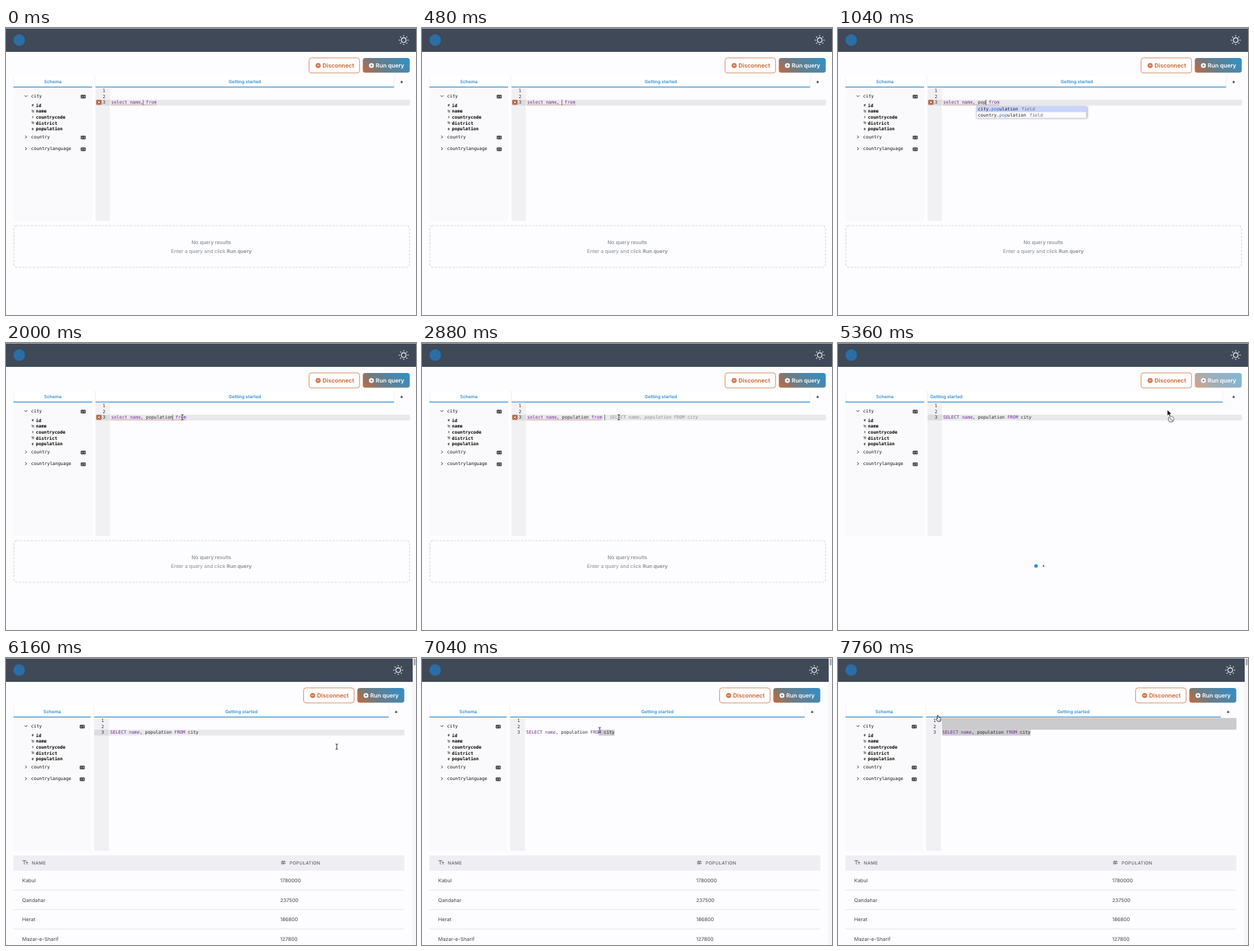
Write an HTML page with a canvas that moves like this. It is 600 px wide and 421 px high and loops after 8000 ms.

```html
<!DOCTYPE html>
<html lang="en">
<head>
<meta charset="utf-8">
<title>Query editor</title>
<style>
html, body { margin: 0; width: 100%; height: 100%; overflow: hidden; background: #fdfcfe; }
canvas { display: block; width: 600px; height: 421px; }
</style>
</head>
<body>
<canvas id="stage"></canvas>
<script>
const W = 600, H = 421, LOOP = 8000, STEP = 80;
const MONO = '"DejaVu Sans Mono", monospace';
const SANS = 'Inter, "Open Sans", sans-serif';
const CODE = '6.5px ' + MONO;
const CHAR = 6.5 * 0.602, ROW = 8.6, TOP = 88;
const BLUE = '#2f8ad0', ORANGE = '#cb632f', INK = '#26262a', PURPLE = '#6f2c9c';

const canvas = document.getElementById('stage');
const ctx = canvas.getContext('2d');
const dpr = window.devicePixelRatio || 1;
canvas.width = W * dpr;
canvas.height = H * dpr;

// Moments of the session, in ms
const T = {
  space: 240, p: 640, o: 800, pop: 960, accept: 1440, showMouse: 1760, click: 2240,
  ghost: 2640, complete: 3840, valid: 4160, leave: 4480, run: 5040, loaded: 5760, drag: 6960
};

// Mouse path: time, x, y
const PATH = [
  [1760, 203, 109], [2160, 288, 109], [4480, 288, 109], [4960, 552, 58], [5120, 552, 58],
  [5360, 483, 101], [5600, 484, 118], [6160, 484, 130], [6240, 484, 130], [6640, 298.5, 111],
  [6880, 298.5, 111], [7360, 150, 91], [7760, 147, 88]
];

function fill(color, x, y, w, h) {
  ctx.fillStyle = color;
  ctx.fillRect(x, y, w, h);
}

function round(x, y, w, h, r) {
  ctx.beginPath();
  ctx.roundRect(x, y, w, h, r);
}

function disc(x, y, r, color) {
  ctx.fillStyle = color;
  ctx.beginPath();
  ctx.arc(x, y, r, 0, Math.PI * 2);
  ctx.fill();
}

function line(points, color, width = 1) {
  ctx.strokeStyle = color;
  ctx.lineWidth = width;
  ctx.beginPath();
  points.forEach(([x, y], i) => i ? ctx.lineTo(x, y) : ctx.moveTo(x, y));
  ctx.stroke();
}

function text(str, x, y, font, color, align = 'left') {
  ctx.font = font;
  ctx.fillStyle = color;
  ctx.textAlign = align;
  ctx.fillText(str, x, y);
}

const sans = (size, weight = 400) => `${weight} ${size}px ${SANS}`;

function mouseAt(t) {
  let i = 0;
  while (i < PATH.length - 2 && t >= PATH[i + 1][0]) i++;
  const [t0, x0, y0] = PATH[i], [t1, x1, y1] = PATH[i + 1];
  const k = Math.min(1, Math.max(0, (t - t0) / (t1 - t0)));
  const e = k * k * (3 - 2 * k);
  return { x: x0 + (x1 - x0) * e, y: y0 + (y1 - y0) * e };
}

function layout(t) {
  const narrow = t >= T.loaded, loading = t >= T.run && !narrow;
  const dx = narrow ? -8 : 0;
  return {
    narrow, loading, dx,
    right: 591 + dx,
    side: narrow ? 124 : 126,
    left: narrow ? 129 : 131,
    code: narrow ? 152.6 : 154,
    tabEnd: loading ? 563 : 568 + dx
  };
}

function drawHeader(L) {
  fill('#3f4958', 0, 0, L.narrow ? 595.5 : W, 35);
  fill('#c9ccd1', 0, 0, W, 0.8);
  disc(19.3, 17.8, 8.5, '#2b6ea6');
  const x = 582 + L.dx, y = 17.8;
  ctx.strokeStyle = '#fff';
  ctx.lineWidth = 1.1;
  ctx.beginPath();
  ctx.arc(x, y, 3.4, 0, Math.PI * 2);
  ctx.stroke();
  for (let i = 0; i < 8; i++) {
    const c = Math.cos(i * Math.PI / 4), s = Math.sin(i * Math.PI / 4);
    line([[x + c * 5.4, y + s * 5.4], [x + c * 7.3, y + s * 7.3]], '#fff', 1.1);
  }
}

function drawButtons(L) {
  const font = sans(8.45, 600);
  ctx.save();
  ctx.translate(L.dx, 0);
  round(443.5, 43.9, 73.9, 22, 3.5);
  ctx.fillStyle = '#fffefe';
  ctx.fill();
  ctx.strokeStyle = '#d98f69';
  ctx.lineWidth = 1;
  ctx.stroke();
  disc(456.8, 55, 3.6, ORANGE);
  fill('#fff', 455.2, 53.5, 1, 3);
  fill('#fff', 457.4, 53.5, 1, 3);
  text('Disconnect', 463.2, 58, font, ORANGE);

  ctx.globalAlpha = L.loading ? 0.62 : 1;
  const g = ctx.createLinearGradient(533.7, 77.7, 579.3, 32.3);
  g.addColorStop(0, '#cb6736');
  g.addColorStop(0.35, '#6b7c85');
  g.addColorStop(1, '#2f90c9');
  round(522.2, 44.1, 68.6, 21.5, 3.5);
  ctx.fillStyle = g;
  ctx.fill();
  ctx.globalAlpha = 1;
  disc(534.8, 55, 3.6, '#fff');
  ctx.fillStyle = '#607683';
  ctx.beginPath();
  ctx.moveTo(533.8, 53.2);
  ctx.lineTo(536.7, 55);
  ctx.lineTo(533.8, 56.8);
  ctx.fill();
  text('Run query', 541, 58, font, '#fff');
  ctx.restore();
}

function drawTabs(L) {
  const font = sans(6.5, 600);
  fill('#fff', 11, 70, L.side - 11, 17);
  fill('#fff', L.left, 70, L.tabEnd - L.left, 17);
  fill('#e9e8ec', 11, 70, 0.6, 16);
  fill('#e9e8ec', L.left - 0.3, 70, 0.6, 16);
  fill(BLUE, 11, 86, L.side - 11, 1.2);
  fill(BLUE, L.left, 86, L.tabEnd - L.left, 1.2);
  text('Schema', (11 + L.side) / 2, 80.8, font, BLUE, 'center');
  if (L.loading) text('Getting started', 135, 80.8, font, BLUE);
  else text('Getting started', (L.left + L.tabEnd) / 2, 80.8, font, BLUE, 'center');
  fill('#e9e8ec', L.tabEnd - 0.3, 70, 0.6, 16);
  const x = 579 + L.dx;
  line([[x - 1.8, 79.2], [x + 1.8, 79.2]], '#222', 1);
  line([[x, 77.4], [x, 81]], '#222', 1);
}

function drawSchema(L) {
  fill('#faf9fb', 11, 87.2, L.side - 11, 195.8);
  const tables = [['city', 99.8], ['country', 159.8], ['countrylanguage', 177]];
  const ix = L.narrow ? 111.5 : 113;
  tables.forEach(([name, y], i) => {
    line(i ? [[28.2, y - 2], [30.2, y], [28.2, y + 2]] : [[27.2, y - 1], [29.2, y + 1], [31.2, y - 1]], '#222', 0.9);
    text(name, 36.8, y + 2.1, CODE, '#111');
    round(ix - 3.6, y - 1.8, 7.2, 5.2, 1);
    ctx.fillStyle = '#3a3a3e';
    ctx.fill();
    fill('#e4e4e8', ix - 2.4, y - 0.3, 1.6, 0.8);
    fill('#e4e4e8', ix - 2.4, y + 1.4, 1.6, 0.8);
    fill('#e4e4e8', ix + 0.3, y - 0.3, 2, 0.8);
    fill('#e4e4e8', ix + 1.4, y + 0.4, 0.8, 1.8);
  });
  const fields = [['#', 'id'], ['Tt', 'name'], ['?', 'countrycode'], ['Tt', 'district'], ['#', 'population']];
  fields.forEach(([icon, name], i) => {
    const y = 115.7 + i * ROW;
    text(icon, 39, y - 0.3, sans(4.8, 700), '#333', 'center');
    text(name, 43.8, y, 'bold ' + CODE, '#000');
  });
}

function query(t) {
  if (t >= T.complete) return 'SELECT name, population FROM city';
  let word = '';
  if (t >= T.accept) word = ' population';
  else if (t >= T.pop) word = ' pop';
  else if (t >= T.o) word = ' po';
  else if (t >= T.p) word = ' p';
  else if (t >= T.space) word = ' ';
  return 'select name,' + word + ' from ';
}

function caretColumn(t, str) {
  return t >= T.click ? str.length : str.length - 6;
}

function caretOn(t) {
  return t < 4240 || (t >= 4720 && t < T.run);
}

function drawCode(str, x, y) {
  for (const m of str.matchAll(/\S+?(?=,|\s|$)|,/g)) {
    const keyword = /^(select|from|name)$/i.test(m[0]);
    text(m[0], x + m.index * CHAR, y, CODE, keyword ? PURPLE : INK);
  }
}

function drawSelection(L, mouse, length) {
  const row = Math.max(0, Math.min(2, Math.floor((mouse.y - TOP) / ROW)));
  const wanted = Math.max(0, Math.round((mouse.x - L.code) / CHAR));
  const col = row < 2 ? 0 : Math.min(length, wanted);
  const x = row < 2 ? L.code : L.code + col * CHAR;
  if (row < 2) fill('#cbcacd', L.code - 0.6, TOP + row * ROW, L.right - L.code + 0.6, (2 - row) * ROW);
  fill('#cbcacd', x, TOP + 2 * ROW, L.code + length * CHAR - x, ROW);
}

function drawEditor(L, t, mouse) {
  const gutter = L.code - 2;
  const str = query(t), lineY = TOP + 2 * ROW;
  const base = TOP + 6.2 + 2 * ROW;
  fill('#f1f0f3', L.left, 87.5, gutter - L.left, 195.5);
  if (t < T.drag) {
    fill('#dcdbde', L.left, lineY, gutter - L.left, ROW - 0.2);
    fill('#e9e8eb', gutter, lineY, L.right - gutter, ROW - 0.2);
  } else {
    drawSelection(L, mouse, str.length);
  }
  for (let i = 0; i < 3; i++) {
    text(i + 1, L.left + 14.4, TOP + 6.2 + i * ROW, CODE, '#333', 'right');
  }
  drawCode(str, L.code, base);

  if (t < T.valid) {
    round(132.3, 105.4, 7.4, 7.2, 1);
    ctx.fillStyle = '#b65a33';
    ctx.fill();
    line([[134.4, 107.4], [137.6, 110.6]], '#fff', 0.9);
    line([[137.6, 107.4], [134.4, 110.6]], '#fff', 0.9);
    ctx.setLineDash([1.2, 0.9]);
    line([[L.code, 112.8], [L.code + str.trim().length * CHAR, 112.8]], '#c2525c', 0.8);
    ctx.setLineDash([]);
  }
  if (t >= T.ghost && t < T.complete) {
    text('SELECT name, population FROM city', L.code + 31 * CHAR - 0.4, base, 'italic ' + CODE, '#8f8e92');
  }
  if (caretOn(t)) fill('#444', L.code + caretColumn(t, str) * CHAR - 0.4, lineY, 0.7, ROW - 0.4);
  if (t >= T.p && t < T.accept) drawPopup(str.length - 19);
}

function drawPopup(typed) {
  ctx.save();
  ctx.shadowColor = 'rgba(0,0,0,.35)';
  ctx.shadowBlur = 3 * dpr;
  ctx.shadowOffsetX = dpr;
  ctx.shadowOffsetY = dpr;
  fill('#fbfafd', 202, 114, 162, 18.4);
  ctx.restore();
  ctx.strokeStyle = '#c4c3c8';
  ctx.lineWidth = 0.6;
  ctx.strokeRect(202.3, 114.3, 161.4, 17.8);
  fill('#c8d4fa', 202.6, 114.6, 160.8, 8.8);
  ['city.', 'country.'].forEach((table, i) => {
    const x = 204.8, y = 121.1 + i * 8.9, n = table.length;
    text(table, x, y, CODE, '#18181a');
    text('population'.slice(0, typed), x + n * CHAR, y, CODE, '#2d69c7');
    text('population'.slice(typed), x + (n + typed) * CHAR, y, CODE, '#18181a');
    text('field', x + (n + 10) * CHAR + 5, y, CODE, '#6a6a70');
  });
}

function drawEmpty() {
  ctx.strokeStyle = '#d6d7dc';
  ctx.lineWidth = 1.1;
  ctx.setLineDash([3.2, 2]);
  round(11.5, 290, 579, 61, 4);
  ctx.stroke();
  ctx.setLineDash([]);
  const gray = '#838a95', plain = sans(7.35), strong = sans(7.35, 600);
  text('No query results', 300.5, 316.6, sans(7.35, 500), gray, 'center');
  const hint = 'Enter a query and click ', bold = 'Run query';
  ctx.font = strong;
  const boldWidth = ctx.measureText(bold).width;
  ctx.font = plain;
  const width = ctx.measureText(hint).width, x = 300.5 - (width + boldWidth) / 2;
  text(hint, x, 329.6, plain, gray);
  text(bold, x + width, 329.6, strong, gray);
}

function drawLoader(t) {
  for (let i = 0; i < 3; i++) {
    const phase = (t - 5360 - i * 280 + 2400) % 1200;
    const off = Math.min(phase, 1200 - phase);
    const r = 2.6 * Math.max(0, Math.cos(off / 400 * Math.PI / 2));
    if (r > 0.05) disc(289.8 + i * 11, 327, r, r < 1.3 ? '#3f5f7c' : BLUE);
  }
}

function drawTable() {
  const rows = [['Kabul', 1780000], ['Qandahar', 237500], ['Herat', 186800], ['Mazar-e-Sharif', 127800]];
  const head = sans(6.5, 500), body = sans(7.35), gray = '#5b626e';
  fill('#efeef2', 11, 289.5, 572, 22.5);
  line([[24.3, 298], [24.3, 297.3], [29.3, 297.3], [29.3, 298]], gray, 0.9);
  line([[26.8, 297.3], [26.8, 303]], gray, 0.9);
  line([[29, 299.7], [32.4, 299.7]], gray, 0.9);
  line([[30.7, 299.7], [30.7, 303]], gray, 0.9);
  for (const d of [0, 2.4]) {
    line([[404.8 + d, 297], [403.8 + d, 303.2]], gray, 0.8);
    line([[402.4, 298.9 + d], [409.4, 298.9 + d]], gray, 0.8);
  }
  ctx.letterSpacing = '0.33px';
  text('NAME', 37.8, 302.5, head, gray);
  text('POPULATION', 415, 302.5, head, gray);
  ctx.letterSpacing = '0px';
  rows.forEach(([name, count], i) => {
    const y = 329 + i * 28.5;
    text(name, 23.8, y, body, '#40464f');
    text(count, 401.2, y, body, '#40464f');
    fill('#e2e2e6', 11, y + 11.1, 572, 0.9);
  });
}

function drawScrollbar() {
  fill('#f8f7fa', 595.5, 0, 4.5, H);
  fill('#e8e7ea', 595.5, 0, 0.5, H);
  round(596.7, 1, 2.7, 10, 1.3);
  ctx.fillStyle = '#a5a5aa';
  ctx.fill();
}

function drawBeam(x, y) {
  const parts = [[[x - 1.8, y - 4], [x, y - 3.4], [x + 1.8, y - 4]], [[x, y - 3.4], [x, y + 3.4]],
    [[x - 1.8, y + 4], [x, y + 3.4], [x + 1.8, y + 4]]];
  parts.forEach(p => line(p, 'rgba(255,255,255,.8)', 1.8));
  parts.forEach(p => line(p, '#222', 0.9));
}

function drawBlocked(x, y) {
  ctx.beginPath();
  [[-0.8, -2.6], [-0.8, 5], [1, 3.5], [2.2, 6], [3.4, 5.4], [2.3, 3], [4.6, 2.8]]
    .forEach(([a, b]) => ctx.lineTo(x + a, y + b));
  ctx.closePath();
  ctx.strokeStyle = '#fff';
  ctx.lineWidth = 0.8;
  ctx.stroke();
  ctx.fillStyle = '#111';
  ctx.fill();
  const cx = x + 4.4, cy = y + 10.8;
  disc(cx, cy, 4.8, '#f4f4f6');
  ctx.strokeStyle = '#8b8b8f';
  ctx.lineWidth = 1.3;
  ctx.beginPath();
  ctx.arc(cx, cy, 4.1, 0, Math.PI * 2);
  ctx.stroke();
  line([[cx - 2.9, cy - 2.9], [cx + 2.9, cy + 2.9]], '#8b8b8f', 1.3);
}

function drawHand(x, y) {
  ctx.save();
  ctx.translate(x, y);
  ctx.beginPath();
  ctx.moveTo(-1.9, -3.4);
  ctx.quadraticCurveTo(-1, -4.6, -0.2, -3.4);
  ctx.lineTo(0.2, -0.8);
  ctx.quadraticCurveTo(3.6, -1.2, 3.8, 0.6);
  ctx.quadraticCurveTo(4, 3, 2.8, 5);
  ctx.lineTo(-1, 5);
  ctx.lineTo(-3.6, 1.4);
  ctx.quadraticCurveTo(-3, 0.2, -1.4, 1.4);
  ctx.closePath();
  ctx.fillStyle = '#fff';
  ctx.fill();
  ctx.strokeStyle = '#222';
  ctx.lineWidth = 0.9;
  ctx.stroke();
  line([[0.9, 1.6], [0.9, 3.6]], '#222', 0.5);
  line([[2.3, 1.6], [2.3, 3.6]], '#222', 0.5);
  ctx.restore();
}

function drawMouse(L, t, { x, y }) {
  const hidden = t < T.showMouse || (t >= T.complete && t < T.leave);
  if (hidden) return;
  const onButton = x > 522 && y < 66;
  if (L.loading) drawBlocked(x, y);
  else if (onButton || x < L.code - 2) drawHand(x, y);
  else drawBeam(x, y);
}

function draw(t) {
  const L = layout(t), mouse = mouseAt(t);
  ctx.setTransform(dpr, 0, 0, dpr, 0, 0);
  ctx.textRendering = 'geometricPrecision';
  ctx.textBaseline = 'alphabetic';
  fill('#fdfcfe', 0, 0, W, H);
  drawHeader(L);
  drawButtons(L);
  drawSchema(L);
  drawTabs(L);
  drawEditor(L, t, mouse);
  if (L.narrow) {
    drawTable();
    drawScrollbar();
  } else if (L.loading) {
    drawLoader(t);
  } else {
    drawEmpty();
  }
  drawMouse(L, t, mouse);
}

const start = performance.now();
function tick() {
  const t = (performance.now() - start) % LOOP;
  draw(Math.floor(t / STEP) * STEP);
  requestAnimationFrame(tick);
}
tick();
</script>
</body>
</html>
```
